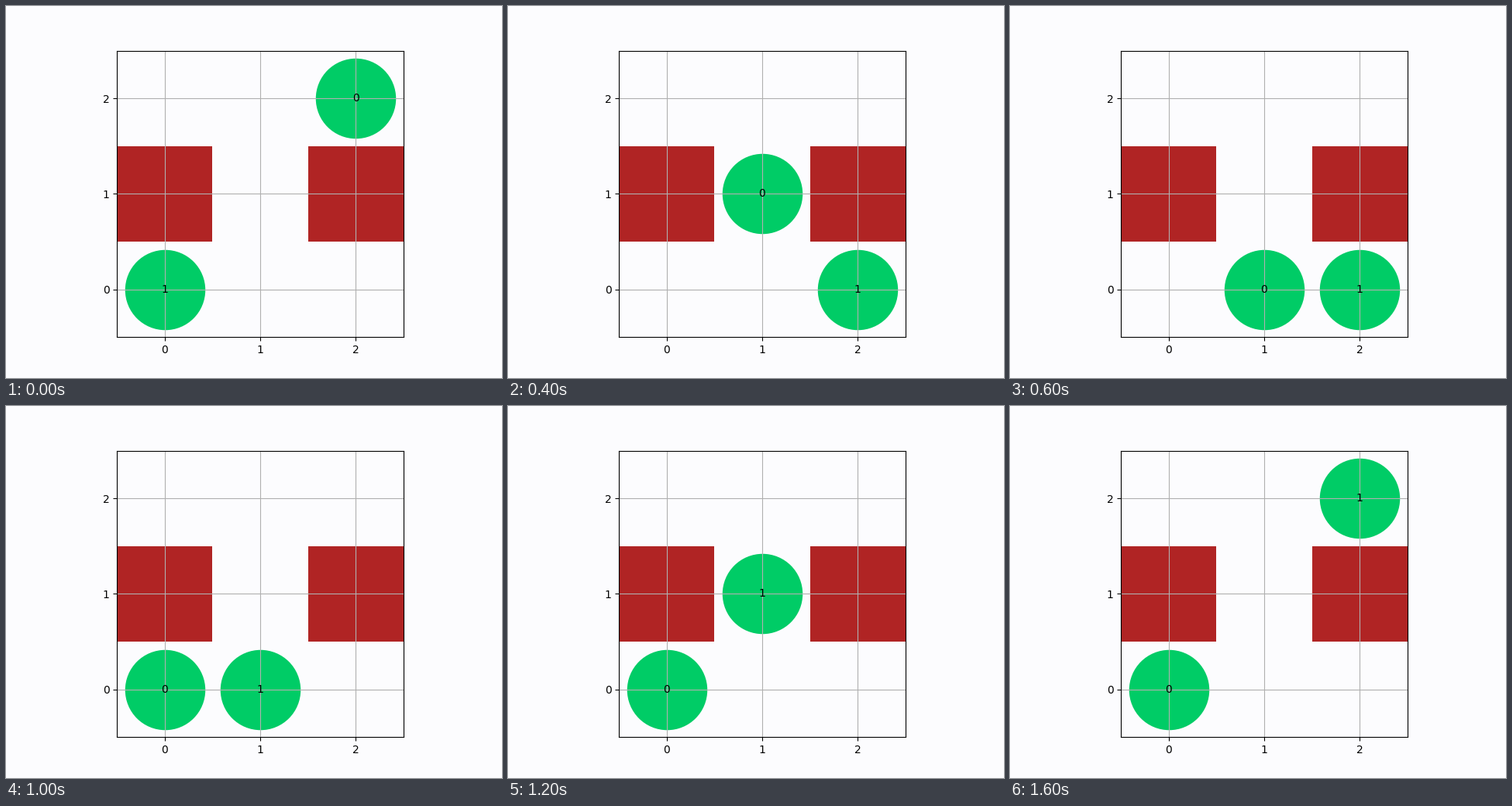
A matplotlib script that plays this animation: 640 by 480 pixels, repeating every 1800 ms.

```python
import matplotlib.pyplot as plt
from matplotlib.animation import FuncAnimation
from matplotlib.patches import Rectangle

STEP_MS = 200
BACKGROUND = "#fcfcfe"
WALL = "#b02424"
AGENT = "#00cc66"

# Grid cell (column, row) of each agent at every step
PATHS = [
    [(2, 2), (1, 2), (1, 1), (1, 0)] + [(0, 0)] * 5,
    [(0, 0), (1, 0)] + [(2, 0)] * 3 + [(1, 0), (1, 1), (1, 2), (2, 2)],
]
WALLS = [(0, 1), (2, 1)]

plt.rcParams["font.family"] = "DejaVu Sans"
fig, ax = plt.subplots(figsize=(6.4, 4.8), dpi=100, facecolor=BACKGROUND)
ax.set_facecolor(BACKGROUND)
ax.set_aspect("equal")
ax.set_xlim(-0.5, 2.5)
ax.set_ylim(-0.5, 2.5)
ax.set_xticks(range(3))
ax.set_yticks(range(3))
ax.grid(True)

for col, row in WALLS:
    ax.add_patch(Rectangle((col - 0.5, row - 0.5), 1, 1, color=WALL, lw=0))


def make_agent(name, cell):
    disc = ax.scatter(*cell, s=5400, color=AGENT)
    label = ax.text(*cell, name, ha="center", va="center")
    return disc, label


agents = [make_agent(str(i), path[0]) for i, path in enumerate(PATHS)]


def update(step):
    for (disc, label), path in zip(agents, PATHS):
        disc.set_offsets([path[step]])
        label.set_position(path[step])
    return [artist for agent in agents for artist in agent]


anim = FuncAnimation(fig, update, frames=len(PATHS[0]), interval=STEP_MS,
                     repeat=True, repeat_delay=0)
plt.show()
```
